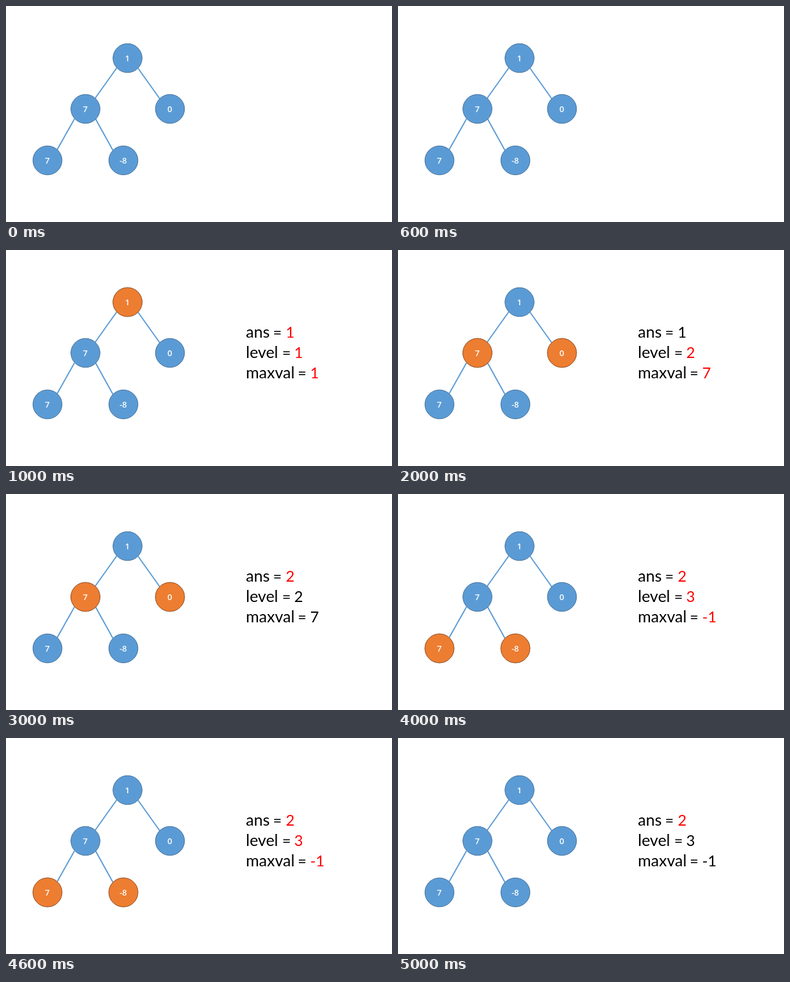
An HTML page that plays this animation: 605x340 px, repeating every 6000 ms.

```html
<!DOCTYPE html>
<html lang="en">
<head>
<meta charset="utf-8">
<title>Maximum level sum of a binary tree</title>
<style>
  html, body { margin: 0; width: 100%; height: 100%; overflow: hidden; background: #fff; }
  svg { display: block; width: 605px; height: 340px; }
  .edge { stroke: #5b9bd5; stroke-width: 1.9; }
  .node circle { fill: #5b9bd5; stroke: #41719c; stroke-width: 1; }
  .node.active circle { fill: #ed7d31; stroke: #ae5a21; }
  .node text { font: 600 13px "Open Sans", "Noto Sans", sans-serif; fill: #fff; text-anchor: middle; }
  .info { font: 23.7px Lato, sans-serif; }
  .label { font-size: 25px; }
  .changed { fill: #f00; }
  .step { visibility: hidden; animation: step 6s step-end infinite; animation-delay: calc((var(--at) - 6) * 1s); }
  @keyframes step {
    0% { visibility: visible; }
    16.6667%, 100% { visibility: hidden; }
  }
</style>
</head>
<body>
<svg id="stage" viewBox="0 0 605 340"></svg>
<script>
  const nodes = [
    { x: 190.5, y: 82, value: "1", level: 1 },
    { x: 124.5, y: 162, value: "7", level: 2 },
    { x: 257, y: 162, value: "0", level: 2 },
    { x: 65, y: 243, value: "7", level: 3 },
    { x: 184, y: 243, value: "-8", level: 3 }
  ];
  const edges = [[173.5, 97.5, 139.5, 145.5], [207, 98, 241, 146], [107.3, 177.7, 80, 226.5], [140.5, 178, 167.5, 227]];
  const rows = [
    { name: "ans", equals: 418.6, value: 438.5, y: 138 },
    { name: "level", equals: 432.8, value: 451.8, y: 170 },
    { name: "maxval", equals: 457.3, value: 476.8, y: 202 }
  ];
  // "*" marks a value shown in red.
  const steps = [
    { level: 1, values: ["1*", "1*", "1*"] },
    { level: 2, values: ["1", "2*", "7*"] },
    { level: 2, values: ["2*", "2", "7"] },
    { level: 3, values: ["2*", "3*", "-1*"] },
    { level: 0, values: ["2*", "3", "-1"] }
  ];

  const text = (x, y, content, cls = "") => `<text x="${x}" y="${y}" class="${cls}">${content}</text>`;

  const drawNode = ({ x, y, value }, cls = "") =>
    `<g class="node ${cls}"><circle cx="${x}" cy="${y}" r="22.8"/>${text(x - 0.3, y + 4.6, value)}</g>`;

  const drawEdge = ([x1, y1, x2, y2]) =>
    `<line class="edge" x1="${x1}" y1="${y1}" x2="${x2}" y2="${y2}"/>`;

  const drawRow = (row, value) =>
    text(376, row.y, row.name, "label") +
    text(row.equals, row.y, "=") +
    text(row.value, row.y, value.replace("*", ""), value.endsWith("*") ? "changed" : "");

  const drawStep = ({ level, values }, i) =>
    `<g class="step" style="--at:${i + 1}">` +
    nodes.filter(n => n.level === level).map(n => drawNode(n, "active")).join("") +
    `<g class="info">${rows.map((row, r) => drawRow(row, values[r])).join("")}</g></g>`;

  document.getElementById("stage").innerHTML =
    edges.map(drawEdge).join("") +
    nodes.map(n => drawNode(n)).join("") +
    steps.map(drawStep).join("");
</script>
</body>
</html>
```
